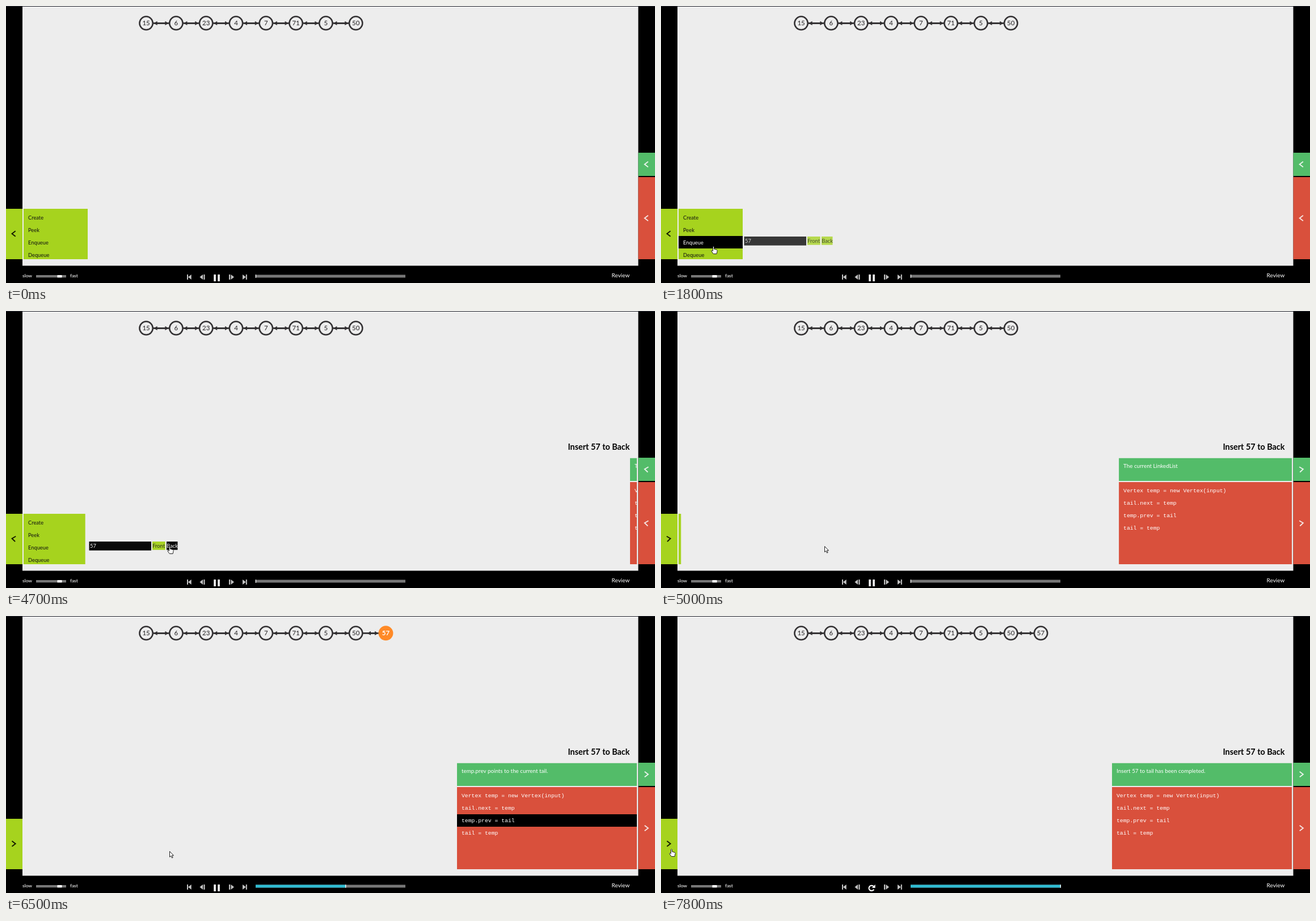
These frames come from a looping animation (1144 px wide and 489 px high, 8000 ms). An HTML page with a canvas:

```html
<!DOCTYPE html>
<html lang="en">
<head>
<meta charset="utf-8">
<title>Deque insertion</title>
<style>
html, body { margin: 0; width: 100%; height: 100%; overflow: hidden; background: #000; }
canvas { display: block; }
</style>
</head>
<body>
<canvas id="stage" width="1144" height="489"></canvas>
<script>
const ctx = document.getElementById('stage').getContext('2d');
const LOOP = 8000, TICK = 100;
const SANS = 'Lato, "Open Sans", sans-serif';
const MONO = '"Liberation Mono", monospace';
const LIME = '#a6d31e', GREEN = '#53bc69', RED = '#d9503c', PAPER = '#ededed';
const DARK = [51, 49, 51], LIGHT = [237, 237, 237], WHITE = [255, 255, 255];
const ORANGE = [255, 138, 39], BLUE = [46, 187, 209];

const VALUES = [15, 6, 23, 4, 7, 71, 5, 50];
const MENU = ['Create', 'Peek', 'Enqueue', 'Dequeue'];
const CODE = ['Vertex temp = new Vertex(input)', 'tail.next = temp', 'temp.prev = tail', 'tail = temp'];
const STATUS = [
  'The current LinkedList',
  'Create new vertex to store value 57.',
  'tail.next points to new vertex, Inserting 57 ...',
  'temp.prev points to the current tail.',
  'Update tail pointer, 57 has been inserted!',
  'Insert 57 to tail has been completed.'
];
const SLIDE = 4650, SLIDE_TIME = 400;
const STEPS = [0, 5200, 5720, 6240, 6760, 7280];
const MORPH = 400;

// time, x, y of the pointer tip
const PATH = [
  [400, 111, 324], [500, 125, 351], [600, 125, 351], [700, 118, 374], [800, 102, 409],
  [900, 91, 425], [1100, 91, 425], [1200, 92, 424], [1800, 92, 424], [2100, 128, 420],
  [2400, 236, 416], [2600, 268, 416], [3100, 268, 416], [3400, 288, 415], [6500, 288, 415],
  [6900, 217, 417], [7000, 217, 417], [7200, 133, 416], [7500, 55, 414], [7800, 18, 411]
];

const clamp = v => Math.max(0, Math.min(1, v));
const lerp = (a, b, k) => a + (b - a) * k;
const swing = k => 0.5 - Math.cos(clamp(k) * Math.PI) / 2;
const cubic = k => k < 0.5 ? 4 * k ** 3 : 1 - 4 * (1 - k) ** 3;
const ease = (t, start) => cubic(clamp((t - start) / MORPH));
const mix = (a, b, k) => a.map((v, i) => lerp(v, b[i], k));
const rgb = c => `rgb(${c.map(Math.round).join()})`;
const nodeX = i => 247.1 + 52.8 * i;

function box(x, y, w, h, color) {
  ctx.fillStyle = color;
  ctx.fillRect(x, y, w, h);
}

function text(str, x, y, size, color, { weight = 400, align = 'left', family = SANS } = {}) {
  ctx.font = `${weight} ${size}px ${family}`;
  ctx.textAlign = align;
  ctx.fillStyle = color;
  ctx.fillText(str, x, y);
}

function poly(points, fill) {
  ctx.beginPath();
  points.forEach(([x, y]) => ctx.lineTo(x, y));
  ctx.closePath();
  ctx.fillStyle = fill;
  ctx.fill();
}

function clipped(x, y, w, h, draw) {
  if (w <= 0) return;
  ctx.save();
  ctx.beginPath();
  ctx.rect(x, y, w, h);
  ctx.clip();
  draw();
  ctx.restore();
}

function pointerAt(t) {
  if (t < PATH[0][0]) return null;
  const i = PATH.findIndex(p => p[0] > t);
  if (i < 0) return PATH[PATH.length - 1].slice(1);
  const [a, b] = [PATH[i - 1], PATH[i]];
  const k = (t - a[0]) / (b[0] - a[0]);
  return [lerp(a[1], b[1], k), lerp(a[2], b[2], k)];
}

function arrowEdge(from, to) {
  const dir = Math.sign(to - from);
  ctx.strokeStyle = rgb(DARK);
  ctx.lineWidth = 2.6;
  ctx.beginPath();
  ctx.moveTo(from, 30.4);
  ctx.lineTo(to - dir * 3, 30.4);
  ctx.stroke();
  poly([[to, 30.4], [to - dir * 6.5, 26.8], [to - dir * 6.5, 34]], rgb(DARK));
}

function node(x, value, fill, stroke, ink, scale = 1, weight = 500) {
  ctx.save();
  ctx.translate(x, 30.3);
  ctx.scale(scale, scale);
  ctx.beginPath();
  ctx.arc(0, 0, 11.7, 0, Math.PI * 2);
  ctx.fillStyle = rgb(fill);
  ctx.fill();
  ctx.lineWidth = 2.5;
  ctx.strokeStyle = rgb(stroke);
  ctx.stroke();
  text(value, 0, 4.1, 11.5, rgb(ink), { weight, align: 'center' });
  ctx.restore();
}

function drawList(t) {
  const last = VALUES.length, end = nodeX(last), tail = nodeX(last - 1);
  for (let i = 0; i < last - 1; i++) {
    arrowEdge(nodeX(i), nodeX(i + 1) - 13);
    arrowEdge(nodeX(i + 1), nodeX(i) + 13);
  }
  if (t >= STEPS[2]) arrowEdge(tail, lerp(tail, end - 13, ease(t, STEPS[2])));
  if (t >= STEPS[3]) arrowEdge(end, lerp(end, tail + 13, ease(t, STEPS[3])));
  VALUES.forEach((v, i) => node(nodeX(i), v, LIGHT, DARK, DARK));

  const grow = ease(t, STEPS[1] + 100);
  if (!grow) return;
  const accent = mix(ORANGE, BLUE, ease(t, STEPS[4]));
  const rest = ease(t, STEPS[5]);
  node(end, 57, mix(accent, LIGHT, rest), mix(accent, DARK, rest), mix(WHITE, DARK, rest),
    grow, rest > 0.5 ? 500 : 700);
}

function chevron(x, y, turn, color) {
  ctx.save();
  ctx.translate(x, y);
  ctx.rotate(turn * Math.PI);
  ctx.beginPath();
  ctx.moveTo(3.1, -4.7);
  ctx.lineTo(-3.1, 0);
  ctx.lineTo(3.1, 4.7);
  ctx.lineWidth = 1.9;
  ctx.strokeStyle = color;
  ctx.stroke();
  ctx.restore();
}

function drawMenu(t, open, pointer) {
  box(0, 358, 29, 89, LIME);
  clipped(31, 358, 113 * (1 - open), 89, () => {
    box(31, 358, 113, 89, LIME);
    MENU.forEach((label, i) => {
      const top = 362 + 22 * i;
      const [x, y] = pointer || [0, 0];
      const hot = t < SLIDE && x > 31 && x < 144 && y >= top && y < top + 22 || (i === 2 && t >= 900 && t < 2200);
      if (hot) box(31, top + 44 * 0, 113, 22, '#000');
      text(label, 39, top + 14.5, 9.3, hot ? '#fff' : '#111');
    });
  });
}

function drawForm(t, open, pointer) {
  if (t < 1800 || open >= 0.95) return;
  ctx.save();
  ctx.globalAlpha = t < 1900 ? 0.77 : 1 - open;
  box(146.5, 407, 109.5, 15.7, '#000');
  text('57', 148, 418.4, 9.4, '#fff');
  [['Front', 258, 22.7], ['Back', 283, 19.5]].forEach(([label, x, w]) => {
    const hot = pointer[0] >= x && pointer[0] < x + w && pointer[1] < 422;
    box(x, 407, w, 14.7, hot ? '#000' : LIME);
    text(label, x + 0.2, 418.2, 9.3, hot ? '#fff' : '#222');
  });
  ctx.restore();
}

function drawPanels(step, open) {
  const left = 1112 - 317 * open;
  box(1114.5, 259, 29.5, 41, GREEN);
  box(1114.5, 302, 29.5, 145, RED);
  if (open) text('Insert 57 to Back', 1099.5, 245, 14.4, '#000', { weight: 700, align: 'right' });
  clipped(left, 259.5, 1112 - left, 188, () => {
    box(left, 259.5, 317, 40.5, GREEN);
    text(STATUS[step], left + 8, 277.4, 9.8, '#fff');
    box(left, 302, 317, 145, RED);
    CODE.forEach((line, i) => {
      const top = 306 + 22 * i;
      if (i === step - 1) box(left, top, 317, 22, '#000');
      text(line, left + 8, top + 13.8, 9.76, '#fff', { family: MONO });
    });
  });
}

function replayIcon() {
  ctx.beginPath();
  ctx.arc(371.2, 480.4, 4.6, 0.5, Math.PI * 1.78);
  ctx.lineWidth = 2.2;
  ctx.strokeStyle = '#fff';
  ctx.stroke();
  poly([[377.6, 474], [377.6, 480], [371.8, 480]], '#fff');
}

function drawControls(step) {
  const gray = '#c4c4c4';
  text('slow', 29, 479.4, 8.4, '#fff', { weight: 500 });
  text('fast', 113, 479.4, 8.4, '#fff', { weight: 500 });
  box(53, 475, 53, 4.3, '#777');
  box(90.5, 475, 8, 4.3, '#fff');

  box(319, 474, 2, 9, gray);
  poly([[321, 478.5], [326.7, 474], [326.7, 483]], gray);
  poly([[341.5, 478.5], [347, 474], [347, 483]], gray);
  box(348.3, 474, 2.2, 9, gray);
  box(393, 474, 2.2, 9, gray);
  poly([[402, 478.5], [396.5, 474], [396.5, 483]], gray);
  poly([[422.8, 478.5], [417, 474], [417, 483]], gray);
  box(422.8, 474, 2, 9, gray);
  if (step === 5) replayIcon();
  else {
    box(366.3, 474, 3.5, 12, '#fff');
    box(373.3, 474, 3.5, 12, '#fff');
  }

  const done = 264 * step / 5;
  box(440, 474.5, 264, 5, '#777');
  box(440, 474.5, done, 5, rgb(BLUE));
  box(439.7 + done, 474.2, 1.3, 5.6, '#fff');
  text('Review', 1067.5, 478.8, 10.05, '#fff');
}

const SHAPES = {
  arrow: 'M0 0V10L2.3 8L4 11.6L5.6 10.9L4 7.3H7Z',
  hand: 'M-1 .8Q0-.6 1 .8V4.5L6 6Q7 6.5 6.6 8L5.6 13H-.2L-3.5 8.3Q-3.6 6.6-2 7.2L-1 8Z',
  beam: 'M-2-5H2M0-5V5M-2 5H2'
};

function drawPointer(t, [x, y]) {
  const overMenu = t < SLIDE && x > 31 && x < 144 && y > 358;
  const overButton = t < 4900 && x >= 258 && x < 303 && y > 407;
  const overInput = t < SLIDE && x >= 146 && x < 256 && y > 407;
  const kind = overMenu || overButton || x < 29 ? 'hand' : overInput ? 'beam' : 'arrow';
  const shape = new Path2D(SHAPES[kind]);
  ctx.save();
  ctx.translate(x + 0.5, y + 0.5);
  ctx.lineJoin = 'round';
  ctx.lineWidth = 1;
  ctx.fillStyle = '#fff';
  ctx.strokeStyle = kind === 'beam' ? '#fff' : '#222';
  if (kind !== 'beam') ctx.fill(shape);
  ctx.stroke(shape);
  ctx.restore();
}

function draw(t) {
  const open = swing((t - SLIDE) / SLIDE_TIME);
  const step = STEPS.filter(s => s <= t).length - 1;
  const pointer = pointerAt(t);
  box(0, 0, 1144, 489, '#000');
  box(0, 0, 1144, 1, '#20232b');
  box(29, 1, 1085.5, 457.5, PAPER);
  drawList(t);
  drawMenu(t, open, pointer);
  drawForm(t, open, pointer);
  drawPanels(step, open);
  chevron(13.6, 402, open, '#151a00');
  chevron(1128.8, 279.5, open, '#e9f3eb');
  chevron(1128.8, 374.5, open, '#f5e3e0');
  drawControls(step);
  if (pointer) drawPointer(t, pointer);
}

const origin = performance.now();
function frame() {
  const t = (performance.now() - origin) % LOOP;
  draw(Math.floor(t / TICK) * TICK);
  requestAnimationFrame(frame);
}
frame();
</script>
</body>
</html>
```
